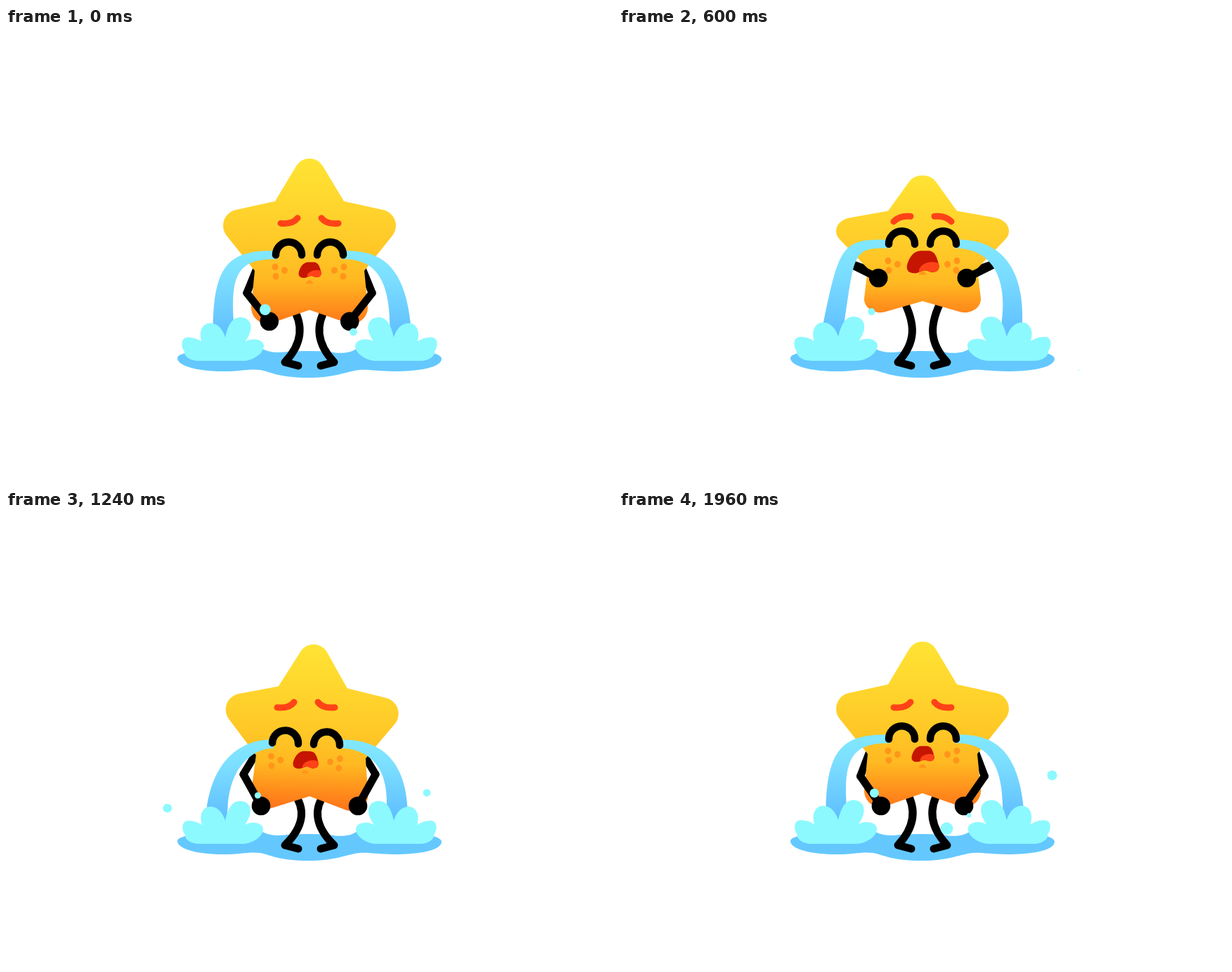
Animation of 864 by 648 pixels, one loop 2 s. Source, as an HTML page with a canvas:

```html
<!DOCTYPE html>
<html lang="en">
<head>
<meta charset="utf-8">
<title>Crying star</title>
<style>
html, body { margin: 0; width: 100%; height: 100%; overflow: hidden; background: #fff; }
canvas { display: block; }
</style>
</head>
<body>
<canvas id="stage" width="864" height="648"></canvas>
<script>
const W = 864, MID = 432, LOOP = 2000, { PI, sin, cos, acos, atan2, hypot, max, min } = Math;
const g = document.getElementById('stage').getContext('2d');
const INK = '#000', RED = '#ff4318', FRECKLE = '#ff961b', FOAM = '#8cf9ff';

// Drop emitters: launches are [start, span]; each launch arcs higher by step
const sprays = [
  { x: 282, y: 422, dx: -77, h: 50, step: 0, r: 6.8, launches: [[140, 460], [860, 560], [1340, 460]] },
  { x: 585, y: 422, dx: 70, h: 30, step: 23, r: 7, launches: [[100, 502], [1140, 500], [1780, 400]] },
  { x: 500, y: 434, dx: -52, h: 18, step: 0, r: 9.3, launches: [[-60, 560], [860, 380], [1510, 700], [1940, 560]] },
  { x: 354, y: 410, dx: 54, h: 38, step: 0, r: 9, launches: [[-110, 400], [540, 600], [1190, 620], [1890, 400]] }
];
const streams = [
  { knee: 328, sway: 17, flick: 18, foot: 5 },
  { knee: 335, sway: 6, flick: -11, foot: -2.5 }
];

const puddle = new Path2D('M244 470C244 463 270 459 310 457L365 457C375 462 385 463 400 461Q430 459 460 461C480 465 492 462 500 456L555 457C595 459 620 463 620 471C620 484 585 489 552 489C530 489 515 486 503 487C480 490 470 498 430 498C390 498 380 491 362 487C345 485 335 489 310 489C275 489 244 482 244 470Z');
const foam = new Path2D('M275 474C262 474 254 467 255 461C250 455 249 441 260 441Q270 441 279 447C274 432 281 421 291 421C302 421 309 431 312 441C315 428 320 413 333 413C348 413 354 428 340 447C352 440 366 445 366 453C366 464 350 474 337 474Z');
// Corners as x, y, rounding radius
const half = [[481, 247, 0], [573, 267, 23], [510, 346, 0], [518.4, 432, 23]];
const star = [[MID, 402, 0], ...half.map(([x, y, r]) => [W - x, y, r]).reverse(), [MID, 165, 22], ...half];

// Timing helpers
function rise(t, from, to) {
  const u = min(1, max(0, (t - from) / (to - from)));
  return u * u * (3 - 2 * u);
}
const hold = (t, a, b, c, d) => rise(t, a, b) - rise(t, c, d);
function bump(t, centre, reach) {
  const d = Math.abs((t - centre + 1.5 * LOOP) % LOOP - LOOP / 2);
  return d < reach ? cos(PI / 2 * d / reach) ** 2 : 0;
}
const swing = (t, peak) => cos(2 * PI * (t - peak) / LOOP);

// Sob with lifted hands, then slump and shake the head once
function poseAt(t) {
  const sob = hold(t, 0, 420, 600, 860), lift = hold(t, -40, 320, 600, 860);
  const shake = min(1, max(0, (t - 640) / 880));
  const tilt = -sin(2 * PI * shake), strain = 5 * tilt * tilt;
  const faceY = 4 - 31 * bump(t, 390, 460) + 26 * bump(t, 880, 300) + 7 * bump(t, 1240, 300);
  const hand = { x: 363 + 18 * bump(t, 240, 600), y: 420 - 64 * lift };
  return {
    tilt, faceY, hand,
    top: 24 * sob + strain,
    base: -13 * lift + strain,
    faceX: -5 * bump(t, 1240, 300),
    brow: 276 + faceY - 8 * tilt + 13 * sob,
    arch: lift,
    mouth: 33 + 14 * sob + strain,
    wail: bump(t, 300, 290),
    elbow: bend({ x: 356, y: 345 }, hand, 35, 51.5),
    splash: 1.02 + 0.02 * swing(2 * t, 1440)
  };
}
// Elbow of a two-bone arm, pointing outward
function bend(from, to, upper, lower) {
  const dx = to.x - from.x, dy = to.y - from.y, d = hypot(dx, dy);
  const c = (upper * upper + d * d - lower * lower) / (2 * upper * d);
  const angle = atan2(dy, dx) + acos(max(-1, min(1, c)));
  return { x: from.x + upper * cos(angle), y: from.y + upper * sin(angle) };
}

// Drawing helpers
function group(draw) { g.save(); draw(); g.restore(); }
function bothSides(draw) {
  group(() => draw(0));
  group(() => { g.translate(W, 0); g.scale(-1, 1); draw(1); });
}
function fill(color, path) {
  g.fillStyle = color;
  path ? g.fill(path) : g.fill();
}
function oval(color, x, y, rx, ry = rx) {
  g.beginPath();
  g.ellipse(x, y, rx, ry, 0, 0, 7);
  fill(color);
}
function line(color, width, d) {
  g.strokeStyle = color;
  g.lineWidth = width;
  g.stroke(new Path2D(d));
}
function gradient(y0, y1, stops) {
  const grad = g.createLinearGradient(0, y0, 0, y1);
  stops.forEach(([at, color]) => grad.addColorStop(at, color));
  return grad;
}

function drawLeg(p) {
  const knee = 423 + max(0, p.base) * 0.7;
  line(INK, 11, `M${408 + p.base * 0.35} ${398 + p.base}C${knee} 422 ${knee} 448 397 476L416 481`);
}

function drawStar(p) {
  const m = (p.base - p.top) / 216, lean = 7 * p.tilt / 220, roll = 0.0325 * p.tilt;
  g.transform(1, roll, -lean, 1 + m, lean * 410, p.top - m * 186 - roll * MID);
  g.beginPath();
  g.moveTo(star[0][0], star[0][1]);
  star.forEach(([x, y, r], i) => {
    const next = star[(i + 1) % star.length];
    if (i) g.arcTo(x, y, next[0], next[1], r);
  });
  g.closePath();
  fill(gradient(186, 424 - p.base * 1.3, [[0, '#ffe434'], [0.56, '#ffc626'],
    [0.73, '#ffb821'], [0.92, '#ff871b'], [1, '#ff761b']]));
}

function drawUpperArm({ elbow }) {
  line(INK, 11, `M356 345L${elbow.x} ${elbow.y}`);
}
function drawForearm({ elbow, hand }) {
  line(INK, 11, `M${elbow.x} ${elbow.y}L${hand.x} ${hand.y}`);
  oval(INK, hand.x, hand.y, 13.3);
}

function drawStream(s, t, x, y) {
  const flick = s.flick * bump(t, 620, 240);
  const foot = 290 + s.foot * swing(t, 100);
  const ax = s.knee + s.sway * swing(t, 1300);
  const bx = 296 + flick, by = y + 13 - 0.8 * flick;
  g.beginPath();
  g.moveTo(x, y - 6);
  g.bezierCurveTo(ax, y - 8, bx, by, foot, 425);
  g.lineTo(foot + 8, 450);
  g.lineTo(foot + 27, 450);
  g.lineTo(foot + 30, 425);
  g.bezierCurveTo(bx + 22, by + 12, ax + 14, y + 5, x, y + 6);
  fill(gradient(y, 430, [[0, '#80e7ff'], [0.3, '#7cdfff'], [1, '#62c1ff']]));
}

function drawMouth({ mouth, wail }) {
  const left = -0.06 - 0.14 * wail;
  g.translate(432.5, 343.3 + (mouth - 36) * 0.3);
  g.scale(mouth, mouth * 0.68);
  const lips = new Path2D(`M-.48 .15C-.42 -.2 ${left - 0.22} -.5 ${left} -.5L.16 -.5
    C.37 -.5 .43 -.2 .49 .15C.52 .45 .3 .52 .15 ${0.4 + wail * 0.1}
    C0 ${0.3 + wail * 0.2} -.1 .5 -.25 .5C-.45 .5 -.5 .35 -.48 .15Z`);
  fill('#c61500', lips);
  g.clip(lips);
  oval(RED, 0.28, 0.42, 0.4, 0.42);
}

function drawFace(p) {
  g.translate(MID + p.faceX, 321 + p.faceY);
  g.rotate(0.04 * p.tilt);
  g.translate(-MID, -321);
  const drop = (p.mouth - 33) * 0.5;
  bothSides(() => {
    [[383, 338], [396.5, 343], [384, 351.5]].forEach(([x, y]) => oval(FRECKLE, x, y + drop, 4.5, 4.8));
    line(INK, 10.5, 'M384 321A18.5 18.5 0 0 1 421 321');
  });
  g.beginPath();
  g.arc(MID, 362 + drop * 0.4, 5, PI, 0);
  fill(FRECKLE);
  group(() => drawMouth(p));
}

function drawBrow({ brow, arch }) {
  line(RED, 9, `M391 ${brow}Q${408 - 8 * arch} ${brow + 2 - 11 * arch} 415 ${brow - 7.5}`);
}

function drawSplash({ splash }) {
  g.translate(309, 474);
  g.scale(splash, splash);
  g.translate(-309, -474);
  fill(FOAM, foam);
}

function drawSpray({ x, y, dx, h, step, r, launches }, t) {
  launches.forEach(([start, span], i) => {
    const u = (t - start) / span;
    if (u <= 0 || u >= 1) return;
    const arc = 4 * (h + step * i) * u * (1 - u);
    oval(FOAM, x + dx * u, y + (488 - y) * u - arc, r * Math.sqrt(sin(PI * u)));
  });
}

function draw(t) {
  const p = poseAt(t);
  g.fillStyle = '#fff';
  g.fillRect(0, 0, W, 648);
  g.lineCap = g.lineJoin = 'round';
  fill('#64c8ff', puddle);
  bothSides(() => { drawLeg(p); drawUpperArm(p); });
  group(() => drawStar(p));
  bothSides(() => drawForearm(p));
  bothSides(side => drawStream(streams[side], t, 386 + (side ? -p.faceX : p.faceX), 321 + p.faceY));
  group(() => drawFace(p));
  group(() => {
    g.translate(p.faceX, 0);
    bothSides(() => drawBrow(p));
  });
  bothSides(() => drawSplash(p));
  sprays.forEach(s => drawSpray(s, t));
}

// 28 held pictures per loop, each starting on a 40 ms tick
const begin = performance.now();
function frame() {
  const t = max(0, performance.now() - begin) % LOOP;
  const step = Math.floor(Math.floor(t / 40) * 14 / 25);
  draw(40 * Math.ceil(step * 25 / 14));
  requestAnimationFrame(frame);
}
frame();
</script>
</body>
</html>
```
